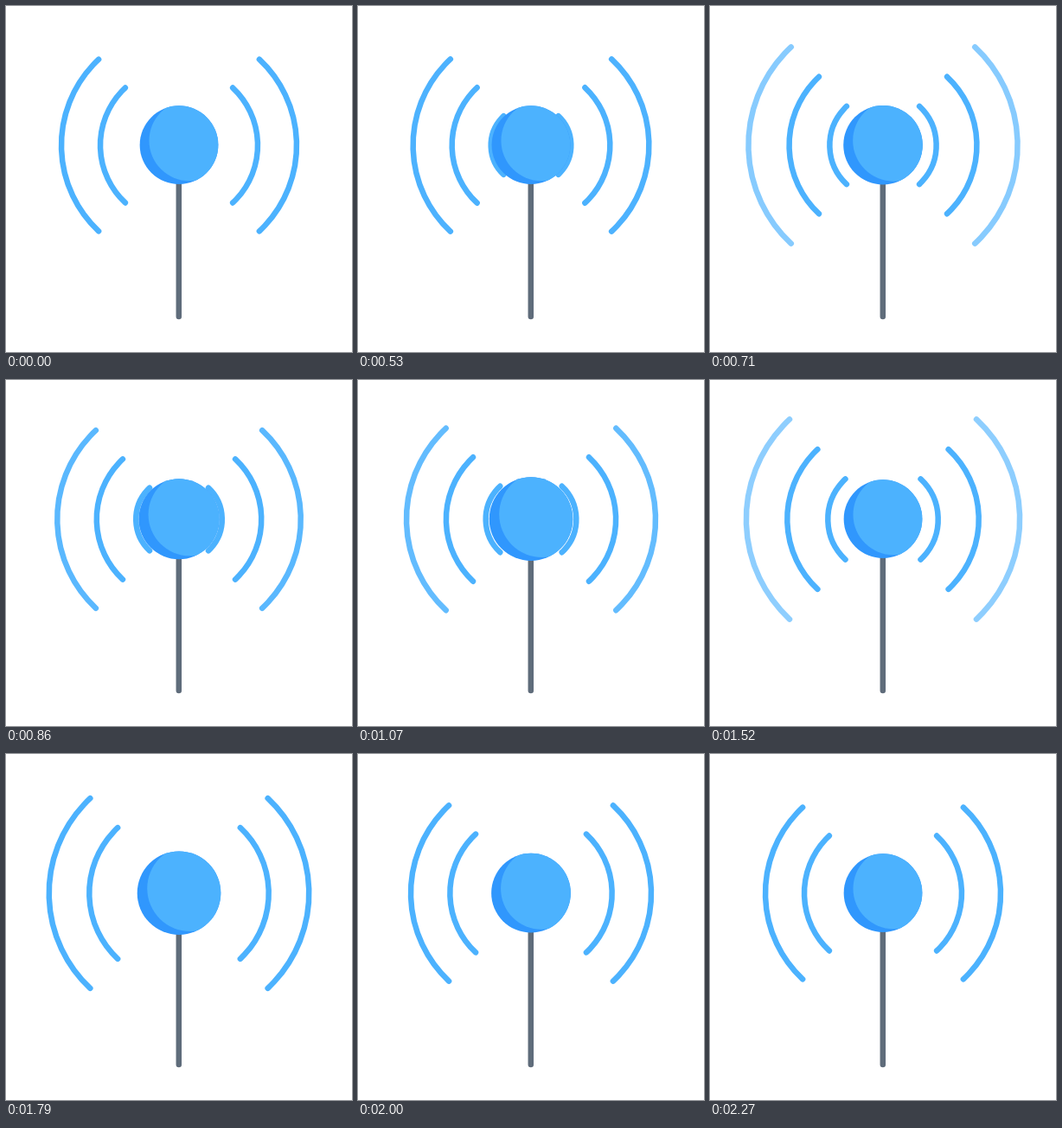
Recreate the animation shown at these times as an HTML page with a canvas. Size 400 px wide and 400 px high, loop 2300 ms.

```html
<!DOCTYPE html>
<html lang="en">
<head>
<meta charset="utf-8">
<title>Antenna signal</title>
<style>
  html, body { margin: 0; width: 100%; height: 100%; overflow: hidden; background: #fff; }
  canvas { display: block; width: 100vmin; height: 100vmin; }
</style>
</head>
<body>
<canvas width="400" height="400"></canvas>
<script>
const ctx = document.querySelector('canvas').getContext('2d');
const LOOP = 2300, HOLD = 530, STEP = 30;
const CX = 200, CY = 161, SPREAD = 0.819;
const BLUE = '#4cb2fe', DARK_BLUE = '#3097fd', GREY = '#5f6c7b';

// The wave train moves outward by PULSES slots, then swings past and settles
const PULSES = 5, SPEED = 0.152, RAMP = 9.6, SETTLE = 18;
const ARRIVAL = RAMP / 2 + PULSES / SPEED;

function travel(tick) {
  if (tick < RAMP) return SPEED * tick * tick / (2 * RAMP);
  if (tick < ARRIVAL) return SPEED * (tick - RAMP / 2);
  const late = Math.min(tick - ARRIVAL, SETTLE);
  return PULSES + SPEED * late * (1 - late / SETTLE) ** 3;
}

function wave(radius, alpha = 1) {
  ctx.globalAlpha = alpha;
  ctx.strokeStyle = BLUE;
  for (const mid of [0, Math.PI]) {
    ctx.beginPath();
    ctx.arc(CX, CY, radius, mid - SPREAD, mid + SPREAD);
    ctx.stroke();
  }
  ctx.globalAlpha = 1;
}

function disc(x, y, radius, color) {
  ctx.beginPath();
  ctx.arc(x, y, radius, 0, 2 * Math.PI);
  ctx.fillStyle = color;
  ctx.fill();
}

function stick() {
  ctx.strokeStyle = GREY;
  ctx.beginPath();
  ctx.moveTo(199.8, CY);
  ctx.lineTo(199.8, 359);
  ctx.stroke();
}

function ball(scale) {
  ctx.save();
  ctx.translate(CX, CY - 0.3);
  ctx.scale(scale, scale);
  disc(0, 0, 45.2, DARK_BLUE);
  ctx.clip();
  disc(12, -5, 46.4, BLUE);
  ctx.restore();
}

function draw(time) {
  const t = time % LOOP;
  const tick = t < HOLD ? 0 : Math.floor((t - HOLD) / STEP) + 1;
  const position = travel(tick);
  const shift = position % 1;
  const sending = tick > 0 && position < PULSES;
  const beat = Math.exp(-(((shift - 0.22) / 0.12) ** 2));

  ctx.fillStyle = '#fff';
  ctx.fillRect(0, 0, 400, 400);
  ctx.lineWidth = 6.5;
  ctx.lineCap = 'round';

  if (sending) wave(46 + 40 * shift + 5 * shift ** 4);
  wave(91 + 45 * shift);
  wave(136 + 50.5 * shift, sending ? 1 - 0.85 * shift : 1);
  stick();
  ball(1 + 0.09 * beat);
}

const start = performance.now();
function loop() {
  draw(performance.now() - start);
  requestAnimationFrame(loop);
}
loop();
</script>
</body>
</html>
```
